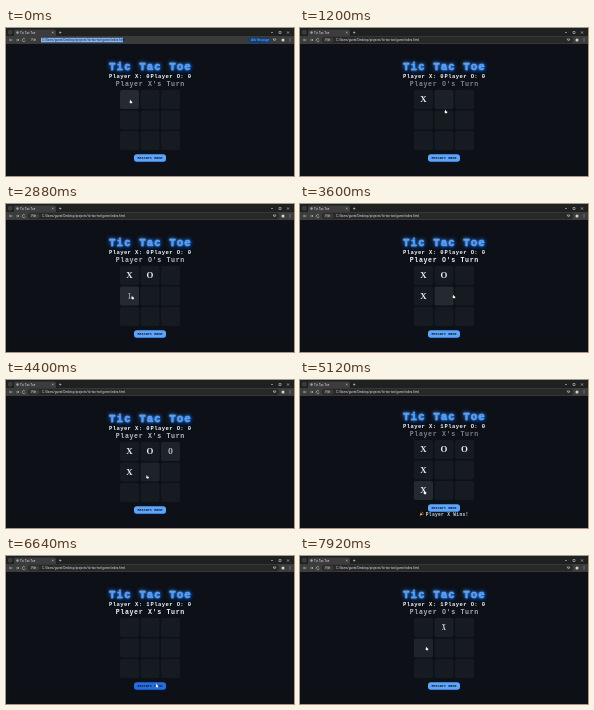
Recreate the animation shown at these times as an HTML page. Size 288x148 px, loop 8000 ms.

```html
<!DOCTYPE html>
<html lang="en">
<head>
<meta charset="utf-8">
<title>Tic Tac Toe</title>
<style>
  html, body { margin: 0; width: 100%; height: 100%; overflow: hidden; background: #0d1117; }
  svg { display: block; width: 100vw; height: 100vh; }
  text { font-family: "Liberation Mono", monospace; font-weight: 700; fill: #f0f6fc; }
  .mid { text-anchor: middle; }
  .title { font-size: 10.8px; letter-spacing: 1.05px; fill: #58a6ff; stroke: #58a6ff; stroke-width: .3; text-shadow: 0 0 2px #58a6ff, 0 0 5px #1f6feb; }
  .score { font-size: 5.5px; letter-spacing: .42px; }
  .status { font-size: 6.6px; letter-spacing: .66px; }
  .mark { font: 700 8.8px "Liberation Serif", serif; fill: #e6edf3; }
  .label { font-size: 3.5px; fill: #0d1117; }
  .win { font-size: 4.6px; letter-spacing: .3px; fill: #c9d1d9; }
  .ui { font: 400 3px Roboto, sans-serif; fill: #dfe1e5; }
  .line { fill: none; stroke: #c7c7c7; stroke-width: .6; }
</style>
</head>
<body>
<svg viewBox="0 0 288 148" preserveAspectRatio="none">
  <rect width="288" height="148" fill="#0d1117"/>
  <g id="browser">
    <rect width="288" height="9" fill="#1f2020"/>
    <rect y="8" width="288" height="8" fill="#3c3c3c"/>
    <rect x="2" y="2" width="4.5" height="4.5" rx="1.2" fill="#3c3c3c"/>
    <path d="M8 8.2V3q0-1.5 1.5-1.5h39q1.5 0 1.5 1.5v5.2z" fill="#3c3c3c"/>
    <circle cx="11.5" cy="4.5" r="1.2" fill="#a0a4a8"/>
    <text class="ui" x="14" y="5.6">Tic Tac Toe</text>
    <path class="line" d="M46 3.7l1.6 1.6m0-1.6l-1.6 1.6M53 4.5h2.4M54.2 3.3v2.4M265 4.5h2M273 3.5h2v2h-2zM281 3.5l2 2m0-2l-2 2"/>
    <path class="line" d="M6.5 12H3.5l1.2-1.2M3.5 12l1.2 1.2M10 12h3l-1.2-1.2M13 12l-1.2 1.2M19 11.2a1.5 1.5 0 1 0 .2 1.3"/>
    <rect id="omnibox" x="22" y="8.8" width="251" height="6.4" rx="3.2"/>
    <rect x="23.5" y="9.8" width="10" height="4.4" rx="2.2" fill="#3c3c3c"/>
    <text class="ui" x="25.5" y="13">File</text>
    <rect id="selection" x="35" y="9.8" width="82" height="4.5" fill="#86b4f4"/>
    <text id="address" class="ui" x="36" y="13">C:/Users/guest/Desktop/projects/tic-tac-toe/game/index.html</text>
    <g id="hint">
      <rect x="242" y="9.6" width="22" height="4.8" rx="2.4" fill="#0b3f80"/>
      <text class="ui" x="245" y="13" style="fill:#7cb5ff">Ask this page</text>
    </g>
    <path class="line" d="M267 11l1.6 2 1.4-2z"/>
    <circle cx="277" cy="12" r="1.5" fill="#d0d3d6"/>
    <path d="M284 10.4v3.2" stroke="#c7c7c7" stroke-width=".7" stroke-dasharray=".7 .5"/>
  </g>
  <g id="page">
    <text class="title mid" x="144.5" y="42.4">Tic Tac Toe</text>
    <text id="scoreX" class="score" x="103" y="49.9"></text>
    <text class="score" x="144.6" y="49.9">Player O: 0</text>
    <text id="status" class="status mid" x="144.3" y="58.3"></text>
    <g id="board"></g>
    <rect id="button" x="128" y="126.2" width="32" height="7.6" rx="2.8"/>
    <text class="label mid" x="144" y="131.2">Restart Game</text>
    <g id="win">
      <path d="M119.6 137.8l1.2-3.2 2 2z" fill="#e3b341"/>
      <path d="M121.5 133.7l.6.8M123 134l-.6 1M123.8 135.8l-.9.2" stroke="#db61a2" stroke-width=".6"/>
      <text class="win" x="125.8" y="137.7">Player X Wins!</text>
    </g>
  </g>
  <path id="cursor" d="M0 0q.5-.3.7.1v1l1.3.4q.4.1.3.6l-.3 1.2H.4L-.6 1.9q0-.5.6-.3z" fill="#fff"/>
</svg>
<script>
const LOOP = 8000, WIN = 4600, RESET = 6200;
const $ = id => document.getElementById(id);

// Pointer stops: time, x, y
const path = [
  [0, 124, 72], [600, 124, 72], [1200, 145, 82], [1500, 144, 73], [1850, 144, 73],
  [2160, 137, 87], [2480, 125, 92], [3100, 126, 92], [3600, 153, 91], [3950, 164, 73],
  [4200, 164, 73], [4560, 124, 111], [5200, 124, 111], [5850, 148, 128],
  [6640, 150, 128], [6960, 150, 128], [7350, 144, 73], [7680, 143, 73], [7920, 126, 91]
];
// Moves: time placed, cell, mark, time cleared
const moves = [
  [420, 0, 'X', RESET], [1700, 1, 'O', RESET], [2700, 3, 'X', RESET],
  [4100, 2, 'O', RESET], [WIN, 6, 'X', RESET], [7640, 1, 'X', LOOP]
];

const svgNode = (tag, attrs) => {
  const node = document.createElementNS('http://www.w3.org/2000/svg', tag);
  for (const key in attrs) node.setAttribute(key, attrs[key]);
  return $('board').appendChild(node);
};
const cells = Array.from({ length: 9 }, (_, i) => {
  const x = 114 + i % 3 * 20.5, y = 62 + Math.floor(i / 3) * 20.5;
  return {
    x, y, w: 19, h: 19,
    box: svgNode('rect', { x, y, width: 19, height: 19, rx: 2 }),
    mark: svgNode('text', { class: 'mark mid', y: 2.9 })
  };
});
const button = { x: 128, y: 126.2, w: 32, h: 7.6 };

const ease = p => p * p * (3 - 2 * p);
const lift = t => t >= WIN && t < RESET ? -2 : 0;

function pointer(t) {
  const next = path.findIndex(p => p[0] > t);
  if (next < 0) return path[path.length - 1].slice(1);
  const [t0, x0, y0] = path[Math.max(0, next - 1)], [t1, x1, y1] = path[next];
  const p = ease(Math.max(0, (t - t0) / (t1 - t0)));
  return [x0 + (x1 - x0) * p, y0 + (y1 - y0) * p];
}

// Share of the last 200 ms that the pointer was over the box
function hover(box, t) {
  let hits = 0;
  for (let k = 0; k < 10; k++) {
    const s = t - k * 20, [x, y] = pointer(s), top = box.y + lift(s);
    if (x >= box.x && x <= box.x + box.w && y >= top && y <= top + box.h) hits++;
  }
  return hits / 10;
}
const mix = (a, b, p) => `rgb(${a.map((v, i) => Math.round(v + (b[i] - v) * p))})`;

function draw(t) {
  const fresh = t < moves[0][0];
  $('selection').style.display = $('hint').style.display = fresh ? '' : 'none';
  $('address').style.fill = fresh ? '#14233a' : '#dfe1e5';
  $('omnibox').style.fill = fresh ? '#3a3b3b' : '#282828';

  const placed = moves.filter(m => t >= m[0] && t < m[3]);
  const won = t >= WIN && t < RESET;
  const turn = won || placed.length % 2 === 0 ? 'X' : 'O';
  $('page').setAttribute('transform', `translate(0 ${lift(t)})`);
  $('win').style.display = won ? '' : 'none';
  $('scoreX').textContent = `Player X: ${t >= WIN ? 1 : 0}`;
  $('status').textContent = `Player ${turn}'s Turn`;
  $('status').style.opacity = .74 + .26 * Math.cos((t - 640) / 1000 * 2 * Math.PI);

  cells.forEach((cell, i) => {
    const move = placed.find(m => m[1] === i);
    cell.box.style.fill = mix([22, 27, 34], [37, 42, 49], hover(cell, t));
    cell.mark.textContent = move ? move[2] : '';
    const grow = move ? ease(Math.min(1, (t - move[0]) / 500)) : 1;
    cell.mark.setAttribute('transform', `translate(${cell.x + 9.5} ${cell.y + 9.5}) scale(${grow} 1)`);
  });
  $('button').style.fill = mix([88, 166, 255], [31, 111, 235], hover(button, t));
  $('cursor').setAttribute('transform', `translate(${pointer(t)})`);
}

const start = performance.now();
function tick() {
  draw((performance.now() - start) % LOOP);
  requestAnimationFrame(tick);
}
tick();
</script>
</body>
</html>
```
